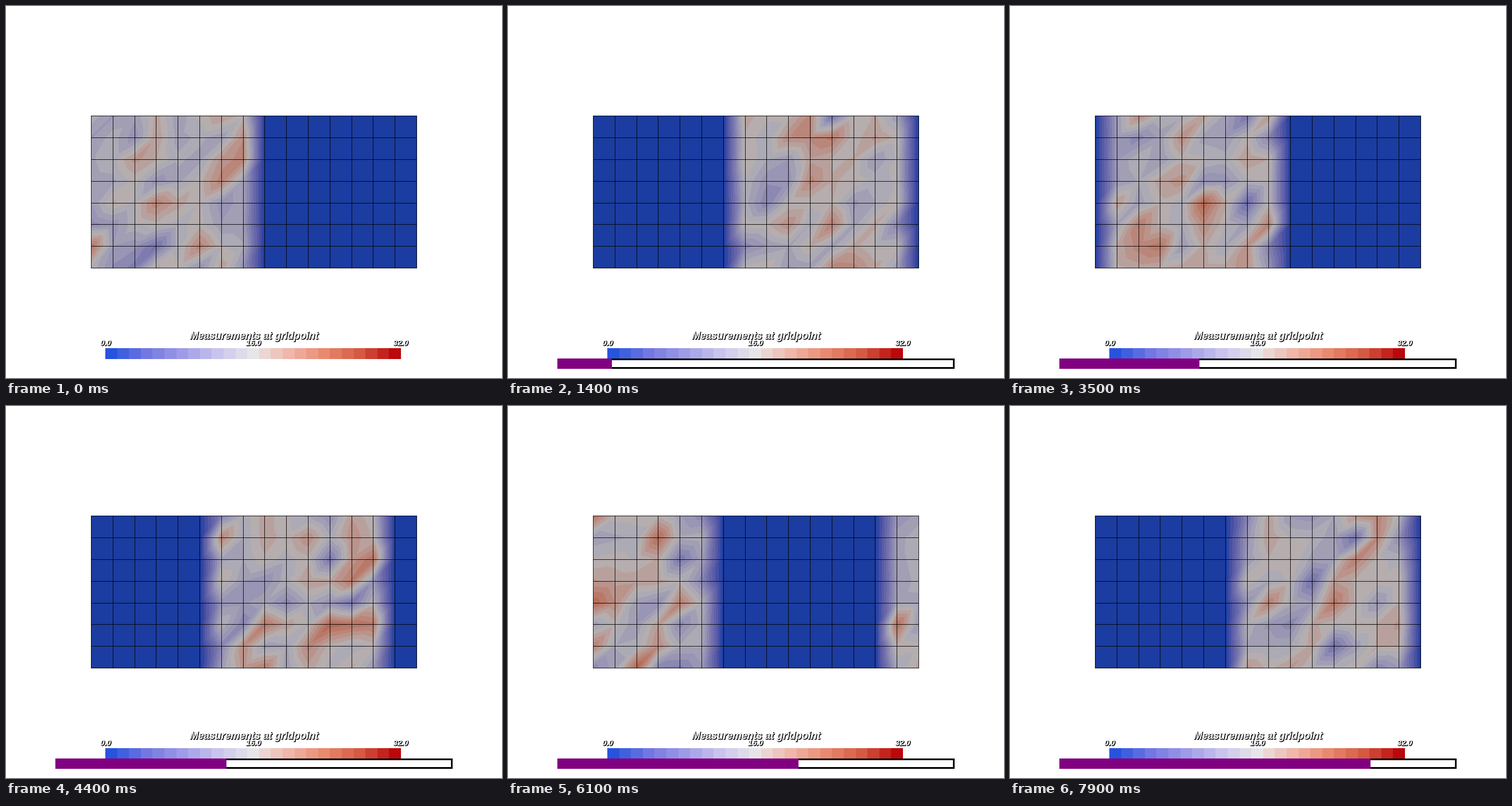
An HTML page with a canvas that plays this animation: 864 by 648 pixels, repeating every 8000 ms.

```html
<!DOCTYPE html>
<html lang="en">
<head>
<meta charset="utf-8">
<title>Measurements at gridpoint</title>
<style>
  html, body { margin: 0; width: 100%; height: 100%; overflow: hidden; background: #fff; }
  canvas { display: block; }
</style>
</head>
<body>
<canvas id="stage" width="864" height="648"></canvas>
<script>
const ctx = document.getElementById('stage').getContext('2d');
const COLS = 16, ROWS = 8, ACTIVE = 8, MAX = 32;
const LEFT = 148, TOP = 191.35, CELL = 37.8, WIDTH = 568, HEIGHT = 266;

// Colour scale, evenly spaced from 0 to MAX.
const SCALE = [
  [38, 84, 222], [115, 119, 226], [158, 155, 232], [200, 196, 238], [232, 229, 232],
  [240, 183, 170], [233, 138, 112], [213, 90, 66], [188, 8, 12]
];

function random(seed) {
  let a = seed * 7919 + 17;
  return () => {
    a = a + 0x6D2B79F5 | 0;
    let t = Math.imul(a ^ a >>> 15, 1 | a);
    t = t + Math.imul(t ^ t >>> 7, 61 | t) ^ t;
    return ((t ^ t >>> 14) >>> 0) / 4294967296;
  };
}

function scaleColor(value) {
  const p = Math.min(Math.max(value / MAX, 0), 1) * (SCALE.length - 1);
  const i = Math.min(Math.floor(p), SCALE.length - 2);
  return SCALE[i].map((c, k) => c + (SCALE[i + 1][k] - c) * (p - i));
}

// The lit surface is darker than the legend, most of all at low values.
const BAND = 1.5;
const meshColors = Array.from({ length: 23 }, (_, i) => {
  const value = i * BAND, shade = 0.72 + 0.06 * Math.min(1, value / 18);
  return scaleColor(value).map(c => c * shade);
});

// A window of noisy readings around 16 moves one column per step and wraps.
function makeField(step) {
  const rnd = random(step);
  const field = Array.from({ length: ROWS }, () => new Array(COLS).fill(0));
  for (const row of field) {
    for (let c = 0; c < ACTIVE; c++) {
      row[(step + c) % COLS] = 16 + 7 * (rnd() + rnd() + rnd() - 1.5);
    }
  }
  return field;
}

// Each cell is two triangles that meet on the rising diagonal.
function sample(field, x, y) {
  const c = Math.min(Math.floor(x), COLS - 2), r = Math.min(Math.floor(y), ROWS - 2);
  const u = x - c, v = y - r;
  const tr = field[r][c + 1], bl = field[r + 1][c];
  if (u + v < 1) {
    const tl = field[r][c];
    return tl + u * (tr - tl) + v * (bl - tl);
  }
  const br = field[r + 1][c + 1];
  return br + (1 - u) * (bl - br) + (1 - v) * (tr - br);
}

const mesh = ctx.createImageData(WIDTH, HEIGHT);
function paintMesh(step) {
  const field = makeField(step), data = mesh.data;
  let i = 0;
  for (let y = 0; y < HEIGHT; y++) {
    for (let x = 0; x < WIDTH; x++) {
      const value = sample(field, Math.min(x / CELL, COLS - 1), Math.min(y / CELL, ROWS - 1));
      const band = Math.min(Math.round(value / BAND), meshColors.length - 1);
      const [red, green, blue] = meshColors[band];
      data[i++] = red;
      data[i++] = green;
      data[i++] = blue;
      data[i++] = 255;
    }
  }
}

function drawGrid() {
  const top = Math.round(TOP);
  ctx.fillStyle = 'rgba(0, 0, 0, .85)';
  for (let c = 0; c < COLS; c++) ctx.fillRect(Math.round(LEFT + c * CELL), top, 1, HEIGHT);
  for (let r = 0; r < ROWS; r++) ctx.fillRect(LEFT, Math.round(TOP + r * CELL), WIDTH, 1);
}

function label(text, x, y, size) {
  ctx.font = `italic bold ${size}px "Liberation Sans", Arial, sans-serif`;
  ctx.textAlign = 'center';
  ctx.lineWidth = 0.8;
  ctx.strokeStyle = ctx.fillStyle = '#000';
  ctx.strokeText(text, x + 1, y + 1);
  ctx.fillText(text, x + 1, y + 1);
  ctx.fillStyle = '#fff';
  ctx.fillText(text, x, y);
}

function drawLegend() {
  const bands = 25, left = 173, width = 515;
  const edge = i => Math.round(left + width * i / bands);
  for (let i = 0; i < bands; i++) {
    ctx.fillStyle = `rgb(${scaleColor(MAX * i / (bands - 1)).map(Math.round)})`;
    ctx.fillRect(edge(i), 596, edge(i + 1) - edge(i), 19);
  }
  label('Measurements at gridpoint', 432, 580, 17.5);
  label('0.0', 173.5, 591, 13.3);
  label('16.0', 431, 591, 13.3);
  label('32.0', 687.5, 591, 13.3);
}

function drawProgress(done) {
  ctx.fillStyle = '#000';
  ctx.fillRect(86, 614, 692, 18);
  ctx.fillStyle = '#fff';
  ctx.fillRect(89, 617, 686, 12);
  ctx.fillStyle = '#800080';
  ctx.fillRect(86, 614, Math.round(done * 691), 18);
}

let shownTick = -1, shownStep = -1;
function frame() {
  const tick = Math.floor(performance.now() % 8000 / 100);
  if (tick !== shownTick) {
    shownTick = tick;
    const step = Math.floor(tick / 2);
    if (step !== shownStep) paintMesh(shownStep = step);
    ctx.fillStyle = '#fff';
    ctx.fillRect(0, 0, 864, 648);
    ctx.putImageData(mesh, LEFT, Math.round(TOP));
    drawGrid();
    drawLegend();
    if (tick > 0) drawProgress(Math.ceil(tick / 2) / 51);
  }
  requestAnimationFrame(frame);
}
frame();
</script>
</body>
</html>
```
